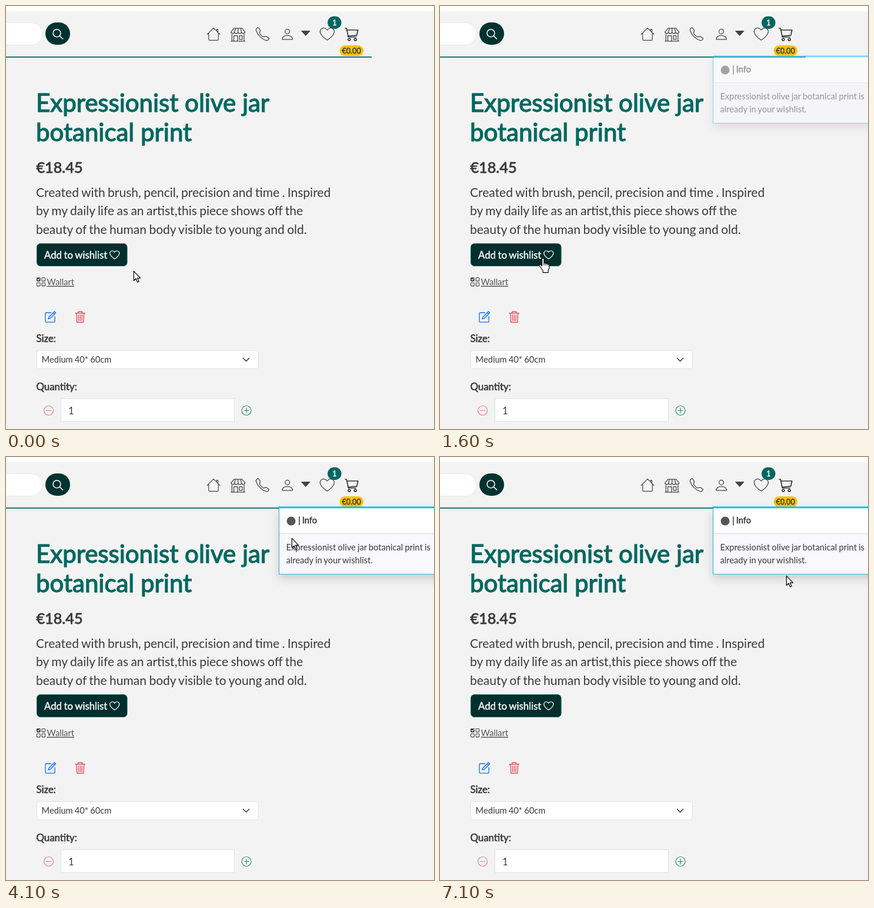
Animation of 728x720 px, one loop 7.2 s. Source, as an HTML page:

```html
<!DOCTYPE html>
<html lang="en">
<head>
<meta charset="utf-8">
<title>Product page</title>
<style>
  html, body { margin: 0; width: 100%; height: 100%; overflow: hidden; background: #f3f3f3; }
  svg { display: block; width: 728px; height: 720px; }
  text { font: 14.7px Lato, sans-serif; fill: #3a3a3a; white-space: pre; word-spacing: -.045em; }
  .bold { stroke: currentColor; stroke-width: .036em; color: #3a3a3a; }
  .title { font-size: 42px; fill: #006860; color: #006860; stroke-width: .031em; word-spacing: 0; }
  .price { font-size: 25.2px; stroke-width: .035em; }
  .body { font-size: 21px; }
  .label { font-size: 16.8px; }
  .small { font-size: 12.6px; }
  .light { fill: #fff; color: #fff; }
  .icon { fill: none; stroke: #444; stroke-linejoin: round; stroke-linecap: round; }
  .field { fill: #fff; stroke: #dee2e6; }
</style>
</head>
<body>
<svg viewBox="0 0 728 720">
  <defs>
    <linearGradient id="strip" x2="0" y2="1">
      <stop offset=".65" stop-color="#fff"/><stop offset="1" stop-color="#f3f3f3"/>
    </linearGradient>
    <filter id="shadow" x="-20%" y="-20%" width="140%" height="150%">
      <feDropShadow dx="0" dy="8" stdDeviation="8" flood-opacity=".16"/>
    </filter>
    <path id="heart" d="M8 14.4C.5 9.5-.9 4.9 1.4 2.6 3.5.6 6.5 1.1 8 3.6c1.5-2.5 4.5-3 6.6-1 2.3 2.3.9 6.9-6.6 11.8z"/>
  </defs>
  <rect width="728" height="720" fill="#f3f3f3"/>
  <rect width="728" height="11" fill="url(#strip)"/>

  <!-- header -->
  <rect x="-40" y="28.5" width="102" height="38" rx="19" class="field" style="stroke:#e6e8ea"/>
  <rect x="67" y="28" width="42" height="38" rx="19" fill="#003230"/>
  <path class="icon" style="stroke:#fff" stroke-width="1.5" d="M91.2 50.7l5.3 5.2M93 46.2a6.5 6.5 0 1 1-13 0 6.5 6.5 0 0 1 13 0z"/>
  <path d="M0 86.9h622" stroke="#006660" stroke-width="1.7"/>
  <g class="icon" stroke-width=".8">
    <path transform="translate(341 35.5) scale(1.5)" d="M.7 8.6 8 1.3l7.3 7.3M2.5 7v7.3a1 1 0 0 0 1 1h9a1 1 0 0 0 1-1V7M13 6V2.8h-1.5v1.7"/>
    <path transform="translate(382 35.5) scale(1.58)" d="M1.5 8v7.5M14.5 8v7.5M.5 15.5h15M3.5 15V9.5h4V15M9.5 9.5h3v4h-3zM3.7 1.5h8.6l3.2 3.8a1.9 1.9 0 0 1-3.75.3 1.9 1.9 0 0 1-3.75 0 1.9 1.9 0 0 1-3.75 0A1.9 1.9 0 0 1 .5 5.3zM4.25 5.6 5.2 1.5M8 5.6V1.5M11.75 5.6l-.95-4.1"/>
    <path transform="translate(423.5 35) scale(1.6)" d="M3.65 1.33a.68.68 0 0 0-1.01-.07L1.6 2.3c-.48.48-.66 1.17-.45 1.77a17.6 17.6 0 0 0 4.17 6.61 17.6 17.6 0 0 0 6.61 4.17c.6.21 1.29.03 1.77-.45l1.03-1.04a.68.68 0 0 0-.06-1.01l-2.31-1.8a.68.68 0 0 0-.58-.12l-2.19.55a1.75 1.75 0 0 1-1.66-.46L5.48 8.06a1.75 1.75 0 0 1-.46-1.66l.55-2.19a.68.68 0 0 0-.12-.58z"/>
    <path transform="translate(466 35.5) scale(1.575)" d="M10.5 5a2.5 2.5 0 1 1-5 0 2.5 2.5 0 0 1 5 0zM2.5 13.5c0-2.5 2-4 5.5-4s5.5 1.5 5.5 4z"/>
    <use href="#heart" transform="translate(533.7 35.3) scale(1.58)"/>
    <path transform="translate(576 35.5) scale(1.5)" style="stroke:#111" stroke-width=".95" d="M.6 1.6h1.5l2.1 10h8.7M2.6 3.6h12.6l-1.5 6.1-9.8.7M6.5 14.4a1.3 1.3 0 1 1-2.6 0 1.3 1.3 0 0 1 2.6 0zM13.4 14.4a1.3 1.3 0 1 1-2.6 0 1.3 1.3 0 0 1 2.6 0z"/>
  </g>
  <path d="M502.5 42.5h14.5l-7.2 8z" fill="#444" stroke="#444" stroke-linejoin="round"/>
  <rect x="547" y="17.5" width="23.5" height="21.5" rx="10.7" fill="#006660"/>
  <text x="555.2" y="33" class="small bold light">1</text>
  <rect x="567.5" y="67" width="40.5" height="18" rx="9" fill="#ffc107"/>
  <text x="571.5" y="80.5" class="small bold">€0.00</text>

  <!-- product -->
  <text x="51" y="180" class="bold title">Expressionist olive jar</text>
  <text x="51" y="230.4" class="bold title">botanical print</text>
  <text x="51.5" y="283.7" class="bold price">€18.45</text>
  <text x="51" y="325" class="body">Created with brush, pencil, precision and time . Inspired</text>
  <text x="51" y="356.4" class="body">by my daily life as an artist,this piece shows off the</text>
  <text x="51" y="387.9" class="body">beauty of the human body visible to young and old.</text>
  <rect id="button" x="52.5" y="404.5" width="153.5" height="38" rx="6" stroke="#0b5f52"/>
  <text x="65" y="430.3" class="label bold light" style="stroke-width:.025em">Add to wishlist</text>
  <use href="#heart" class="icon" style="stroke:#fff" stroke-width="1.1" transform="translate(176.3 415.3) scale(1.06)"/>
  <g class="icon" stroke-width="1.1">
    <rect x="52.5" y="462.5" width="5.6" height="5.6" rx="1" fill="#444"/>
    <path d="M53.9 465.3l1.2 1.2 2-2.3" style="stroke:#fff"/>
    <rect x="61" y="462.5" width="5.6" height="5.6" rx="1"/>
    <rect x="52.5" y="471" width="5.6" height="5.6" rx="1"/>
    <rect x="61" y="471" width="5.6" height="5.6" rx="1"/>
  </g>
  <text x="69.5" y="475.3" style="fill:#555;text-decoration:underline">Wallart</text>
  <path class="icon" style="stroke:#0d6efd" transform="translate(65 518.7) scale(1.31)" d="M8.8 2.5H2.5a1 1 0 0 0-1 1v10.3a1 1 0 0 0 1 1h10.3a1 1 0 0 0 1-1V7.5M6 8.3 13.3 1 15 2.7 7.7 10l-2.4.7zM11.8 2.5l1.7 1.7"/>
  <path class="icon" style="stroke:#dc3545" stroke-width=".9" transform="translate(115.7 518.5) scale(1.31)" d="M1.7 3.3h12.6M5.5 3.2V1.3h5v1.9M3 3.6l.8 11.6h8.4L13 3.6M5.6 5.5l.3 7.7M8 5.5v7.7M10.4 5.5l-.3 7.7"/>
  <text x="51.5" y="571.8" class="label bold">Size:</text>
  <rect x="52.5" y="586.5" width="377" height="31" rx="4" class="field"/>
  <text x="60.5" y="607">Medium 40* 60cm</text>
  <path class="icon" stroke-width="1.7" d="M403.5 599.5l5 5 5-5"/>
  <text x="51.5" y="654" class="label bold">Quantity:</text>
  <rect x="93.5" y="668.5" width="295" height="39" class="field"/>
  <text x="106" y="695" class="label">1</text>
  <path class="icon" style="stroke:#e07b80" stroke-width="1.1" d="M80.5 688.5a8 8 0 1 1-16 0 8 8 0 0 1 16 0zM68.5 688.5h8"/>
  <path class="icon" style="stroke:#2b8a72" stroke-width="1.2" d="M417 688.5a8 8 0 1 1-16 0 8 8 0 0 1 16 0zM405 688.5h8M409 684.5v8"/>

  <g id="toast">
    <rect x="464" y="84.5" width="300" height="115" fill="#f8f8fd" filter="url(#shadow)"/>
    <path d="M464 87h264v43H464z" fill="#fff"/>
    <path d="M464 130.5h264" stroke="#d9dbdf"/>
    <path d="M464.5 85v114.5H728" fill="none" stroke="#2fb9d8" stroke-width="1.1"/>
    <path d="M464 85.7h264" stroke="#0dbff0" stroke-width="3"/>
    <circle cx="485" cy="109" r="7.5" fill="#555"/>
    <text x="497" y="113" class="bold">| Info</text>
    <text x="476.5" y="159.2">Expressionist olive jar botanical print is</text>
    <text x="476.5" y="181">already in your wishlist.</text>
  </g>

  <g id="cursor" fill="#fff" stroke="#000" stroke-width="1.2" stroke-linejoin="round">
    <path id="arrow" d="M.3.3v16.2L4 13l2.7 6.2L9.2 18 6.5 12.2h5z"/>
    <path id="hand" transform="translate(-6 -1.5)" d="M5.5 2.3a1.7 1.7 0 0 1 3.4 0v7.2l1.3-.8 1.9 1 1.6-.4 1.5 1.3 1.6.2 1 1.6v5l-1.7 4.1v3.7H7v-3.7l-4.5-6-2-2.7c0-1.4 1.6-1.9 2.6-.9L5.5 14zM8.9 9.5V13M12.1 10v3M15.2 10.8V13"/>
  </g>
</svg>
<script>
  const LOOP = 7200, STEP = 100;
  const $ = id => document.getElementById(id);
  const clamp = v => Math.max(0, Math.min(1, v));

  // cursor stops: time, x, y
  const stops = [
    [0, 217, 451], [400, 198, 440], [800, 174, 430], [2300, 174, 430],
    [2800, 549, 208], [3200, 630, 196], [3600, 600, 160], [4100, 486, 138],
    [4500, 580, 166], [4900, 653, 198], [5300, 640, 203], [5700, 589, 202], [LOOP, 589, 202]
  ];

  function cursorAt(t) {
    const i = stops.findIndex(s => s[0] > t);
    const [t0, x0, y0] = stops[i - 1], [t1, x1, y1] = stops[i];
    const u = (t - t0) / (t1 - t0), k = u * u * (3 - 2 * u);
    return [x0 + (x1 - x0) * k, y0 + (y1 - y0) * k];
  }

  function draw(now) {
    const t = Math.floor(now % LOOP / STEP) * STEP;
    const [x, y] = cursorAt(t);
    const over = x > 52 && x < 207 && y > 404 && y < 443;
    $("cursor").setAttribute("transform", `translate(${Math.round(x)} ${Math.round(y)})`);
    $("hand").style.display = over ? "" : "none";
    $("arrow").style.display = over ? "none" : "";
    $("button").setAttribute("fill", over && t < 1500 ? "#146350" : "#002f2e");
    $("toast").setAttribute("opacity", clamp((t - 1500) / 200));
  }

  const start = performance.now();
  (function tick() {
    draw(performance.now() - start);
    requestAnimationFrame(tick);
  })();
</script>
</body>
</html>
```
